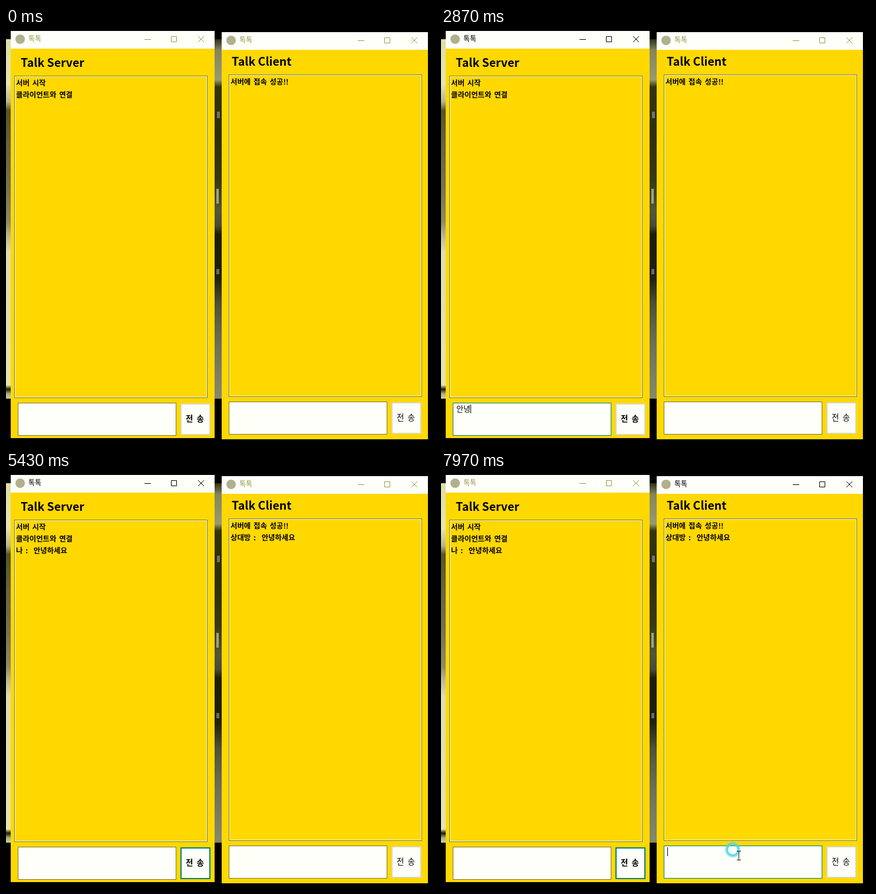
Animation of 728x706 px, one loop 8 s. Source, as an HTML page with a canvas:

```html
<!DOCTYPE html>
<html lang="ko">
<head>
<meta charset="utf-8">
<title>Talk</title>
<style>
html, body { margin: 0; width: 100%; height: 100%; overflow: hidden; background: #000; }
canvas { display: block; }
</style>
</head>
<body>
<canvas id="stage" width="728" height="706"></canvas>
<script>
const g = document.getElementById('stage').getContext('2d');
const FONT = '"Noto Sans CJK KR", "Noto Sans CJK", sans-serif';
const LOOP = 8000;
const GOLD = '#ffd800', DIM = '#99994d', LINE = '#77773c', TEAL = '#00807c';
const ACTIVATE = 2440, TYPE = 2560, KEY = 55, SEND = 3760, BLUR = 5700, CLIENT_CLICK = 7760;
const clicks = [2440, 3620, CLIENT_CLICK];
const strokes = ['ㅇ', '아', '안', '안ㄴ', '안녀', '안녕', '안녕ㅎ', '안녕하',
  '안녕핫', '안녕하세', '안녕하셍', '안녕하세요'];

// Pointer journeys: [time, x, y]
const paths = [
  [[1900, -24, 330], [2390, 134, 664], [2560, 134, 664]],
  [[3230, 134, 664], [3580, 313, 674], [3900, 313, 674], [4400, -24, 420]],
  [[6340, -24, 410], [6640, 60, 430], [7230, 257, 503], [7600, 505, 651], [8000, 505, 651]]
];

const server = {
  frame: [8, 5, 346, 691], head: [25, 66], icon: [24, 19], controls: [235, 19],
  log: [14, 81, 328, 547], input: [20, 636, 269, 56], send: [296, 637, 51, 54],
  name: 'Talk Server', weight: 700
};
const client = {
  frame: [366, 7, 350, 691], head: [383, 64], icon: [382, 21], controls: [597, 21],
  log: [378, 79, 328, 547], input: [378, 634, 269, 56], send: [654, 635, 51, 54],
  name: 'Talk Client', weight: 400
};

const during = (t, a, b) => t >= a && t < b;
const inside = (p, [x, y, w, h]) => p && p.x >= x && p.x < x + w && p.y >= y && p.y < y + h;

function pointer(t) {
  for (const path of paths) {
    for (let i = 1; i < path.length; i++) {
      const [t0, x0, y0] = path[i - 1], [t1, x1, y1] = path[i];
      if (during(t, t0, t1)) {
        const k = (t - t0) / (t1 - t0);
        return { x: x0 + (x1 - x0) * k, y: y0 + (y1 - y0) * k };
      }
    }
  }
  return null;
}

// Hover darkens at once and fades after the pointer leaves
function hover(t, box) {
  for (let k = 0; k < 13; k++) {
    if (inside(pointer(t - k * 20), box)) return Math.min(1, 1.3 - k / 10);
  }
  return 0;
}

function fill(color, x, y, w, h) {
  g.fillStyle = color;
  g.fillRect(x, y, w, h);
}

function outline(color, [x, y, w, h], inset = 0, width = 1) {
  const o = inset + width / 2;
  g.strokeStyle = color;
  g.lineWidth = width;
  g.strokeRect(x + o, y + o, w - 2 * o, h - 2 * o);
}

function hoverOutline(t, box) {
  g.globalAlpha = hover(t, box);
  outline('#222', box);
  g.globalAlpha = 1;
}

function text(str, x, y, size, weight = 400, color = '#000', spacing = 0) {
  g.font = `${weight} ${size}px ${FONT}`;
  g.wordSpacing = spacing + 'px';
  g.fillStyle = color;
  g.fillText(str, x, y);
}

function disc(x, y, r, color) {
  g.fillStyle = color;
  g.beginPath();
  g.arc(x, y, r, 0, 7);
  g.fill();
}

function strip(x, w, stops) {
  const shade = g.createLinearGradient(0, 19, 0, 629);
  for (const [y, color] of stops) shade.addColorStop((y - 19) / 610, color);
  fill(shade, x, 19, w, 610);
}

function backdrop() {
  fill('#000', 0, 0, 728, 706);
  strip(0, 8, [[19, '#dedea0'], [95, '#e6e6aa'], [125, '#b8b884'], [140, '#55552a'], [200, '#66663c'],
    [270, '#74744a'], [330, '#8c8c62'], [350, '#b4b48a'], [380, '#dedea8'], [606, '#e4e4ac'],
    [613, '#1a1a0c'], [621, '#b0b080'], [629, '#d0d09a']]);
  strip(354, 12, [[19, '#303018'], [38, '#85855c'], [88, '#999970'], [100, '#33330c'], [180, '#2e2e08'],
    [260, '#383814'], [310, '#55553a'], [335, '#4a4a3c'], [350, '#1c1c08'], [425, '#20200e'],
    [470, '#50503c'], [540, '#70705a'], [629, '#88886c']]);
  fill('#a0a08a', 357, 273, 4, 25);
  fill('#70707a', 358, 142, 5, 11);
  fill('#666672', 357, 409, 5, 9);
}

function controls([x, y], color) {
  g.strokeStyle = color;
  g.lineWidth = 1;
  g.beginPath();
  g.moveTo(x, y + .5);
  g.lineTo(x + 11, y + .5);
  g.rect(x + 45.5, y - 4.5, 9, 9);
  g.moveTo(x + 91, y - 5);
  g.lineTo(x + 101, y + 5);
  g.moveTo(x + 101, y - 5);
  g.lineTo(x + 91, y + 5);
  g.stroke();
}

function drawWindow(t, win, state) {
  const { frame: [x, y, w, h], log, input, send } = win;
  const ink = state.active ? '#000' : DIM;
  fill(GOLD, x, y, w, h);
  fill('#fffffa', x, y, w, 30);
  disc(...win.icon, 8, '#b0b08c');
  text('톡톡', win.icon[0] + 14, win.icon[1] + 4, 12, 400, ink);
  controls(win.controls, ink);
  text(win.name, ...win.head, 19.5, 700);

  outline(LINE, log);
  outline('#ffffd8', log, 1);
  hoverOutline(t, log);
  state.lines.forEach((line, i) => text(line, log[0] + 3, log[1] + 17 + i * 20, 12.4, 700, '#000', 2));

  fill('#fffffa', ...input);
  outline(LINE, input);
  hoverOutline(t, input);
  if (state.focus === 'input') outline(TEAL, input);
  text(state.draft, input[0] + 6, input[1] + 15, 13);
  if (state.caret) {
    fill('#000', input[0] + 6 + Math.round(g.measureText(state.draft).width), input[1] + 3, 1, 15);
  }

  fill('#fffffa', ...send);
  outline('#d8d8b8', send, 0, 2);
  hoverOutline(t, send);
  if (state.focus === 'send') outline(TEAL, send, 0, 2);
  text('전 송', send[0] + 9, send[1] + 31, 13.5, win.weight, '#000', 3);
}

function halo(x, y, r, hole, rgb) {
  const glow = g.createRadialGradient(x, y, 0, x, y, r);
  const stop = (at, alpha) => glow.addColorStop(at, `rgba(${rgb},${alpha})`);
  stop(0, 0);
  stop(hole - .06, 0);
  stop(hole + .06, .95);
  stop(hole + .2, .8);
  stop(1, 0);
  disc(x, y, r, glow);
}

function ibeam(x, y) {
  g.strokeStyle = '#222';
  g.lineWidth = 1;
  g.beginPath();
  for (const side of [-8, 7]) {
    g.moveTo(x - 3, y + side + .5);
    g.lineTo(x + 4, y + side + .5);
  }
  g.moveTo(x + .5, y - 7);
  g.lineTo(x + .5, y + 7);
  g.stroke();
}

function arrow(x, y) {
  g.save();
  g.translate(x + .5, y + .5);
  g.fillStyle = '#fff';
  g.strokeStyle = '#000';
  g.lineWidth = 1;
  g.beginPath();
  for (const [px, py] of [[0, 0], [0, 16], [4, 12], [7, 18], [9, 17], [6.5, 11.5], [11.5, 11.5]]) g.lineTo(px, py);
  g.closePath();
  g.fill();
  g.stroke();
  g.restore();
}

function spinner(x, y) {
  g.lineWidth = 4;
  g.strokeStyle = '#2088b8';
  g.beginPath();
  g.arc(x, y, 6, 0, 7);
  g.stroke();
}

function drawPointer(t) {
  const p = pointer(t);
  if (!p) return;
  const x = Math.round(p.x), y = Math.round(p.y);
  const overText = [server, client].some(w => inside(p, w.log) || inside(p, w.input));
  const click = clicks.find(c => during(t, c, c + 300));
  const hx = overText ? x - 10 : x, hy = overText ? y - 10 : y - 8;
  if (click) halo(hx, hy, 9 + (t - click) / 40, .55, '70,215,230');
  else halo(hx, hy, 10, .5, '250,60,10');
  if (overText) ibeam(x, y);
  else arrow(x, y);
  if (during(t, 3600, SEND)) spinner(x + 14, y + 1);
}

function draw(t) {
  const sent = t >= SEND, typed = Math.floor((t - TYPE) / KEY);
  const draft = sent || typed < 0 ? '' : strokes[Math.min(typed, strokes.length - 1)];
  const joined = t >= CLIENT_CLICK;
  backdrop();
  drawWindow(t, server, {
    active: during(t, ACTIVATE, BLUR),
    focus: sent ? 'send' : t >= ACTIVATE ? 'input' : '',
    lines: ['서버 시작', '클라이언트와 연결', ...(sent ? ['나 :  안녕하세요'] : [])],
    draft, caret: during(t, ACTIVATE, 3400)
  });
  drawWindow(t, client, {
    active: joined,
    focus: joined ? 'input' : '',
    lines: ['서버에 접속 성공!!', ...(sent ? ['상대방 :  안녕하세요'] : [])],
    draft: '', caret: joined
  });
  drawPointer(t);
}

const start = performance.now();
function tick() {
  draw((performance.now() - start) % LOOP);
  requestAnimationFrame(tick);
}
tick();
</script>
</body>
</html>
```
